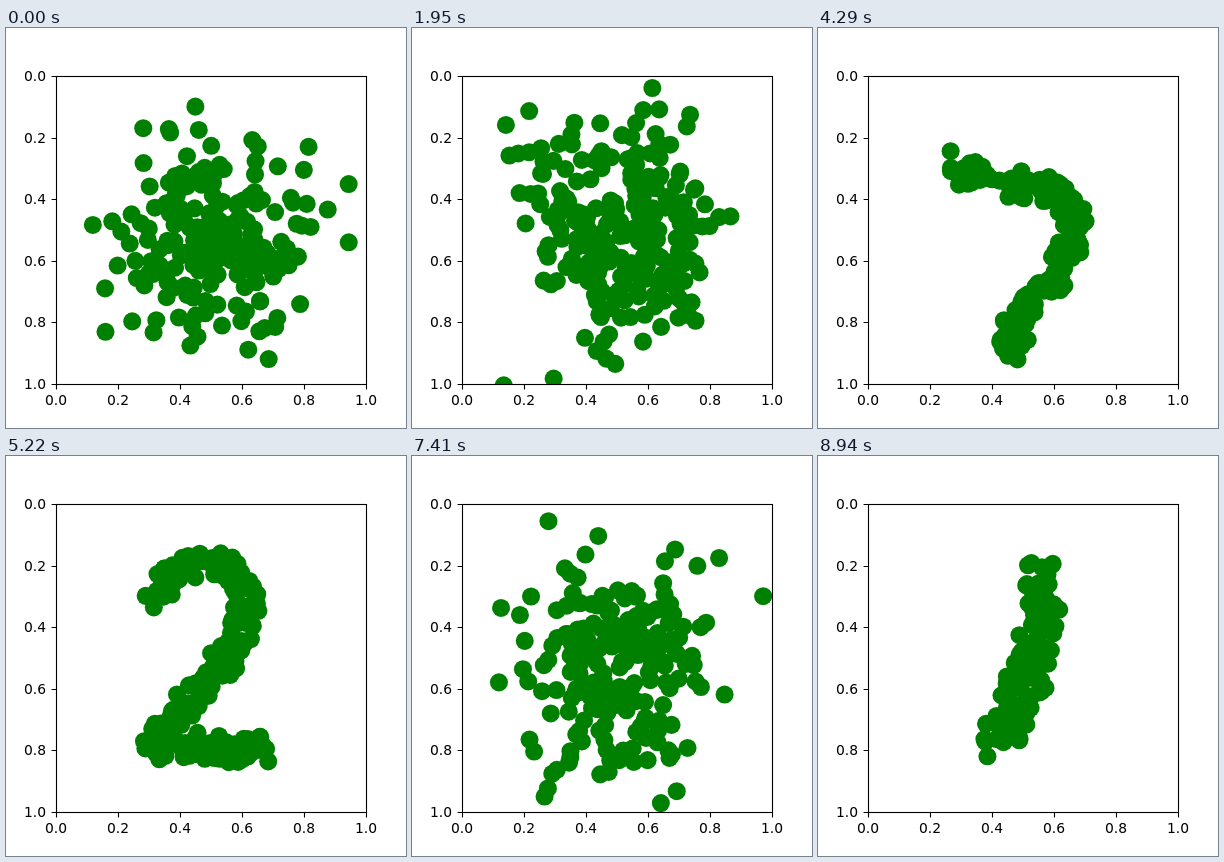
Recreate the animation shown at these times as an HTML page with a canvas. Size 400 px wide and 400 px high, loop 9 s.

```html
<!DOCTYPE html>
<html>
<head>
<meta charset="utf-8">
<style>
html, body { margin: 0; width: 100%; height: 100%; overflow: hidden; background: #fff; }
canvas { display: block; }
</style>
</head>
<body>
<canvas id="stage" width="400" height="400"></canvas>
<script>
const ctx = document.getElementById('stage').getContext('2d');
const STEP = 30, MORPH = 20, CYCLE = 31, LOOP = 9000;
const LEFT = 50, TOP = 48, W = 310, H = 308;

let seed = 11;
function rand() {
  seed = (seed + 0x6D2B79F5) | 0;
  let t = Math.imul(seed ^ (seed >>> 15), 1 | seed);
  t = (t + Math.imul(t ^ (t >>> 7), 61 | t)) ^ t;
  return ((t ^ (t >>> 14)) >>> 0) / 4294967296;
}
const gauss = () => Math.sqrt(-2 * Math.log(1 - rand())) * Math.cos(2 * Math.PI * rand());

// Centre lines of the digits, in percent of the axes.
const digits = [
  'M70 20L45 22 39 44Q64 42 65 60Q62 84 32 77',
  'M54 48C30 36 40 18 54 18S74 34 54 48S36 82 50 82S70 60 54 48',
  'M52 18C28 18 28 82 50 82S74 18 52 18',
  'M56 18C38 34 30 82 50 82S70 54 40 62',
  'M29.5 28Q30 34 45 34.5T66 40Q68 55 57 68T46 90',
  'M32 30C46 8 72 22 58 46L32 78 70 80',
  'M14 23Q40 17 58 22Q58 38 38 41L26 46Q50 44 64 48Q82 52 81 65Q77 79 45 79Q28 80 15 77',
  'M36 22L32 48 64 49M67 20L56 82',
  'M64 28C46 8 32 40 46 46S66 40 64 28L56 82',
  'M56.5 22Q56 46 48.5 64L42.5 77'
];

// Random points spread over a pen stroke; their number follows its area.
function strokePoints(d, pen) {
  const path = document.createElementNS('http://www.w3.org/2000/svg', 'path');
  path.setAttribute('d', d);
  const length = path.getTotalLength();
  return Array.from({ length: Math.round(length * pen / 3.3) }, () => {
    const { x, y } = path.getPointAtLength(rand() * length);
    const r = pen * Math.sqrt(rand()), a = 2 * Math.PI * rand();
    return [x + r * Math.cos(a), y + r * Math.sin(a)];
  });
}

// Give every noise point the closest free point of the digit.
function build(d, i) {
  const pool = strokePoints(d, i === digits.length - 1 ? 7 : 5);
  return pool.map(() => [50 + 15.5 * gauss(), 52 + 18 * gauss()]).map(start => {
    const dist = q => Math.hypot(q[0] - start[0], q[1] - start[1]);
    const end = pool.reduce((best, q) => dist(q) < dist(best) ? q : best);
    pool.splice(pool.indexOf(end), 1);
    return { start, end };
  });
}
const scenes = digits.map(build);

function drawAxes() {
  ctx.strokeStyle = ctx.fillStyle = '#000';
  ctx.lineWidth = 1.11;
  ctx.font = '13.89px "DejaVu Sans", sans-serif';
  ctx.strokeRect(LEFT + .5, TOP + .5, W, H);
  ctx.beginPath();
  for (let i = 0; i <= 5; i++) {
    const x = LEFT + W * i / 5, y = Math.round(TOP + H * i / 5), label = (i / 5).toFixed(1);
    ctx.moveTo(x + .5, TOP + H + .5);
    ctx.lineTo(x + .5, TOP + H + 5.4);
    ctx.moveTo(LEFT + .5, y + .5);
    ctx.lineTo(LEFT - 4.4, y + .5);
    ctx.fillText(label, x - 11, 377);
    ctx.fillText(label, LEFT - 32, y + 5);
  }
  ctx.stroke();
}

function frame(now) {
  const step = Math.floor(now % LOOP / STEP) + 1;
  const t = Math.min(step % CYCLE, MORPH) / MORPH;
  const u = t * t * (3 - 2 * t);
  ctx.fillStyle = '#fff';
  ctx.fillRect(0, 0, 400, 400);
  ctx.save();
  ctx.beginPath();
  ctx.rect(LEFT, TOP, W, H);
  ctx.clip();
  ctx.fillStyle = '#008000';
  for (const { start, end } of scenes[Math.floor(step / CYCLE)]) {
    const [x, y] = start.map((v, i) => v + (end[i] - v) * u);
    ctx.beginPath();
    ctx.arc(LEFT + .5 + x * W / 100, TOP + .5 + y * H / 100, 9.03, 0, 2 * Math.PI);
    ctx.fill();
  }
  ctx.restore();
  drawAxes();
}

const born = performance.now();
function tick() {
  frame(performance.now() - born);
  requestAnimationFrame(tick);
}
tick();
</script>
</body>
</html>
```
